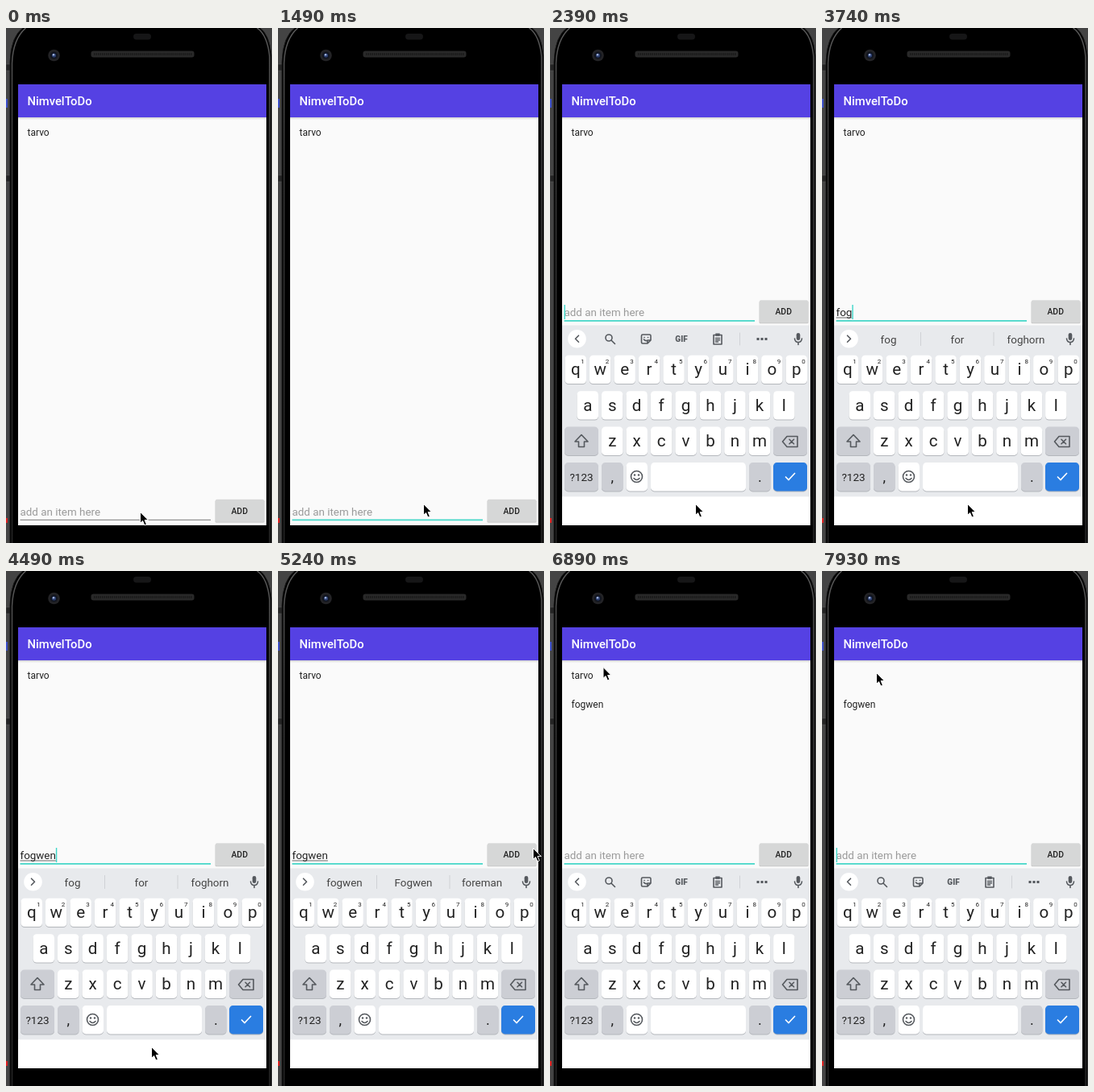
Write an HTML page that moves like this. It is 330 by 640 pixels and loops after 8000 ms.

```html
<!DOCTYPE html>
<html lang="en">
<head>
<meta charset="utf-8">
<title>To-do app demo</title>
<style>
html, body { margin: 0; width: 100%; height: 100%; overflow: hidden; background: #000; }
svg { display: block; width: 330px; height: 640px; }
text { font-family: Roboto, "Noto Sans", sans-serif; fill: #222; }
.mid { text-anchor: middle; }
.ico { fill: none; stroke: #55595e; stroke-width: 1.6; stroke-linejoin: round; stroke-linecap: round; }
.solid { fill: #55595e; stroke: none; }
</style>
</head>
<body>
<svg viewBox="0 0 330 640" xmlns="http://www.w3.org/2000/svg">
  <defs>
    <clipPath id="screen"><rect x="15" y="70" width="308" height="548"/></clipPath>
    <linearGradient id="shade" x1="0" y1="0" x2="0" y2="1">
      <stop offset="0" stop-color="#000" stop-opacity=".16"/>
      <stop offset="1" stop-color="#000" stop-opacity="0"/>
    </linearGradient>
    <linearGradient id="rim" gradientUnits="userSpaceOnUse" x1="0" y1="0" x2="0" y2="640">
      <stop offset="0" stop-color="#5a5a5a"/>
      <stop offset=".25" stop-color="#3c3c3c"/>
      <stop offset="1" stop-color="#262626"/>
    </linearGradient>
  </defs>

  <!-- phone body -->
  <rect width="330" height="640" fill="#444"/>
  <rect y="88" width="2" height="11" fill="#3d50c8"/>
  <rect y="609" width="2" height="6" fill="#d22"/>
  <path d="M0 45h6v8H0zM0 183h6v8H0z" fill="#242424" stroke="#555" stroke-width=".6"/>
  <path d="M5 641V42Q6 10 22-1H314Q327 8 329 34V641Z" fill="#000" stroke="#161616"/>
  <path d="M7.500 640V44Q8.500 14 24.500 0M311.500 0Q324.500 9 327 36V640" fill="none" stroke="url(#rim)" stroke-width="1.500"/>
  <rect x="158" y="7" width="22" height="7.500" rx="3.700" fill="#161617"/>
  <rect x="105.500" y="28.500" width="128" height="8" rx="3" fill="#292929"/>
  <path d="M109 32.500H231" stroke="#1a1a1a" stroke-width="3" stroke-dasharray="1.500 1"/>
  <circle cx="59.500" cy="34" r="7.300" fill="#232326"/>
  <circle cx="59.500" cy="34" r="4.600" fill="#11151f"/>
  <circle cx="59.500" cy="34" r="2.600" fill="#2c3f70"/>
  <circle cx="59" cy="33.300" r="1.200" fill="#a5b6dc"/>

  <g clip-path="url(#screen)">
    <rect x="15" y="70" width="308" height="548" fill="#fafafa"/>
    <rect x="15" y="111" width="308" height="3" fill="url(#shade)"/>
    <rect x="15" y="70" width="308" height="41" fill="#5541e3"/>
    <text x="26.500" y="96" font-size="14.800" font-weight="500" style="fill:#fff">NimvelToDo</text>
    <text id="first" x="26.500" y="134" font-size="12">tarvo</text>
    <text id="second" x="26.500" y="170" font-size="12">fogwen</text>

    <g id="field">
      <text id="hint" x="17.500" y="358" font-size="13.400" style="fill:#9a9a9a">add an item here</text>
      <text id="typed" x="17.500" y="358" font-size="13.400"></text>
      <path id="compose" stroke="#444" stroke-width=".8"/>
      <rect id="line" x="17.500" width="236.500"/>
      <rect id="caret" y="344" width="1.400" height="18" fill="#3cd6c8"/>
      <rect x="259.500" y="339.300" width="61" height="28" rx="1.500" fill="#000" opacity=".2"/>
      <rect x="260" y="338.300" width="60" height="28" rx="1.500" fill="#d6d7d7"/>
      <text class="mid" x="289.700" y="356" font-size="10.400" font-weight="500">ADD</text>
    </g>

    <g id="board">
      <rect x="15" y="369.500" width="308" height="213" fill="#e8eaed"/>
      <rect x="15" y="582.500" width="308" height="60" fill="#fff"/>
      <circle cx="33.500" cy="386.200" r="11.300" fill="#fff"/>
      <path id="chevron" class="ico"/>
      <g id="tools" class="ico">
        <circle cx="73" cy="385" r="4"/><path d="M76 388l4.500 4.500"/>
        <path d="M115 381h8.500q1.500 0 1.500 1.500v5.500l-4 4h-6q-1.500 0-1.500-1.500v-8q0-1.500 1.500-1.500zM125 388h-4v4M116.500 387q1.500 2 3.500 1.500"/>
        <path d="M117 384.500h.1M121.500 384.500h.1"/>
        <text class="mid solid" x="163" y="390" font-size="10" font-weight="900">GIF</text>
        <path d="M203 381.500h10v11.500h-10zM205.500 385.500h5M205.500 387.800h5M205.500 390h3"/>
        <rect class="solid" x="205.300" y="379.500" width="5.400" height="3.300"/>
        <path d="M235.500 379v15" stroke="#d0d2d6" stroke-width="1"/>
        <path class="solid" d="M256.500 385h3v3h-3zM261.500 385h3v3h-3zM266.500 385h3v3h-3z"/>
      </g>
      <g id="words">
        <path d="M122.500 378v17M213 378v17" stroke="#cfd1d5"/>
      </g>
      <rect class="solid" x="305.700" y="379" width="4.600" height="9" rx="2.300"/>
      <path class="ico" d="M303.500 386q.5 4.500 4.500 4.500t4.500-4.500M308 391v2.500"/>
      <g id="keys"></g>
      <path class="ico" d="M39 505.500l8 8.500h-4.500v6.500h-7V514h-4.500z"/>
      <path class="ico" d="M294 507.500h13v13h-13l-5.500-6.500zM297 511.300l5.500 5.500M302.500 511.300l-5.500 5.500"/>
      <g class="ico">
        <circle cx="107.500" cy="557.500" r="7"/>
        <path d="M104 559.500q3.500 4 7 0"/>
        <circle class="solid" cx="105" cy="555.500" r="1.200"/><circle class="solid" cx="110" cy="555.500" r="1.200"/>
      </g>
      <path d="M292 557.500l4 4 8-8.500" fill="none" stroke="#fff" stroke-width="1.600"/>
    </g>
  </g>

  <path id="mouse" d="M0 0V13.800L3.100 11L5.400 16.500L7.900 15.400L5.600 10.100H9.900Z" fill="#000" stroke="#fff" stroke-width="1"/>
</svg>
<script>
const NS = "http://www.w3.org/2000/svg";
const $ = id => document.getElementById(id);
const LOOP = 8000;

function add(parent, tag, attrs, text) {
  const el = document.createElementNS(NS, tag);
  for (const k in attrs) el.setAttribute(k, attrs[k]);
  if (text) el.textContent = text;
  parent.appendChild(el);
  return el;
}

// Keyboard
const GREY = "#ccced4";
function key(x, y, w, fill, label, size = 20.6) {
  const box = { x, width: w, height: 35.3, rx: 4.5 };
  add($("keys"), "rect", { ...box, y: y + 1, fill: "#b4b7bc" });
  add($("keys"), "rect", { ...box, y, fill });
  if (label) add($("keys"), "text", { class: "mid", x: x + w / 2, y: y + (size < 16 ? 22.5 : 24.3), "font-size": size }, label);
}
[["qwertyuiop", 18.5, 406.8], ["asdfghjkl", 33.5, 451.3], ["zxcvbnm", 64, 495.6]].forEach(([row, x0, y], r) =>
  [...row].forEach((c, i) => {
    const x = x0 + i * 30.45;
    key(x, y, 26.5, "#fff", c);
    if (!r) add($("keys"), "text", { class: "mid", x: x + 22, y: y + 9.8, "font-size": 8 }, String((i + 1) % 10));
  }));
key(18, 495.6, 42, GREY);
key(277, 495.6, 42, GREY);
key(18, 540.1, 42, GREY, "?123", 13.5);
key(64, 540.1, 26.5, GREY, ",", 18);
key(94.5, 540.1, 26.5, "#fff");
key(125, 540.1, 118, "#fff");
key(247, 540.1, 26.5, GREY, ".", 18);
key(277, 540.1, 42, "#2a7de1");

const words = [82.5, 168, 253].map(x =>
  add($("words"), "text", { class: "mid", x, y: 391.5, "font-size": 13.4, style: "fill:#444" }));

// Each list holds [start time, value]; the latest started value applies.
const at = (list, t) => list.reduce((v, [s, x]) => t >= s ? x : v, null);

const typing = [[0, ""], [2990, "f"], [3440, "fo"], [3590, "fog"], [4190, "fogw"],
  [4340, "fogwe"], [4490, "fogwen"], [6140, ""]];
const guesses = [[0, ""], [3290, "f for from"], [3440, "fo for food"], [3740, "fog for foghorn"],
  [4640, "fogwen Fogwen foreman"], [6290, ""]];
const blink = [[0, 0], [1790, 1], [2840, 0], [2990, 1], [5240, 0], [6140, 1],
  [6590, 0], [7040, 1], [7490, 0], [7930, 1]];

// Pointer strokes: start, end, from x, y, to x, y
const strokes = [
  [0, 150, 166.5, 601.5, 166.5, 601.5],
  [600, 890, 227, 589, 180.5, 591.5],
  [890, 4790, 180.5, 591.5, 180.5, 591.5],
  [5240, 5840, 316.5, 344.5, 299.5, 345.5],
  [5840, 6140, 299.5, 345.5, 299.5, 345.5],
  [6140, 6890, 299.5, 345.5, 66, 119.5],
  [6890, 7040, 66, 119.5, 67.5, 126.5],
  [7040, LOOP, 67.5, 126.5, 67.5, 126.5]
];
const ease = p => p * p * (3 - 2 * p);

const tick = t => t < 890 ? Math.floor(t / 150) * 150 : 890 + Math.floor((t - 890) / 150) * 150;

function pointer(t) {
  const s = strokes.find(s => t >= s[0] && t < s[1]);
  if (!s) return null;
  const p = ease((tick(t) - s[0]) / (s[1] - s[0]));
  return [s[2] + (s[4] - s[2]) * p, s[3] + (s[5] - s[3]) * p];
}

const show = (id, on) => $(id).style.display = on ? "" : "none";
const set = (id, attrs) => { for (const k in attrs) $(id).setAttribute(k, attrs[k]); };

function draw(t) {
  const text = at(typing, t), guess = at(guesses, t);
  const focused = t >= 1490;

  show("first", t < 7930);
  show("second", t >= 6140);
  set("second", { opacity: t < 6290 ? 0.55 : 1 });

  set("field", { transform: `translate(0 ${t < 2240 ? 247.5 : 0})` });
  show("hint", !text);
  $("typed").textContent = text;
  const end = 17.5 + (text ? $("typed").getComputedTextLength() : 0);
  set("compose", { d: text ? `M17.5 360H${end}` : "" });
  set("line", focused ? { y: 363, height: 1.8, fill: "#49d8ca" } : { y: 363.3, height: 1, fill: "#777" });
  show("caret", at(blink, t));
  set("caret", { x: end });

  show("board", t >= 2240);
  const rising = t < 2390;
  set("board", { transform: `translate(0 ${rising ? 181.5 : 0})`, opacity: rising ? 0.25 : 1 });
  show("tools", !guess);
  show("words", guess);
  guess.split(" ").forEach((w, i) => words[i].textContent = w);
  set("chevron", { d: guess ? "M31.5 382.2l4 4-4 4" : "M35.5 382.2l-4 4 4 4" });

  const m = pointer(t);
  show("mouse", m);
  if (m) set("mouse", { transform: `translate(${m[0]} ${m[1]})` });
}

const start = performance.now();
function loop() {
  draw((performance.now() - start) % LOOP);
  requestAnimationFrame(loop);
}
loop();
</script>
</body>
</html>
```
